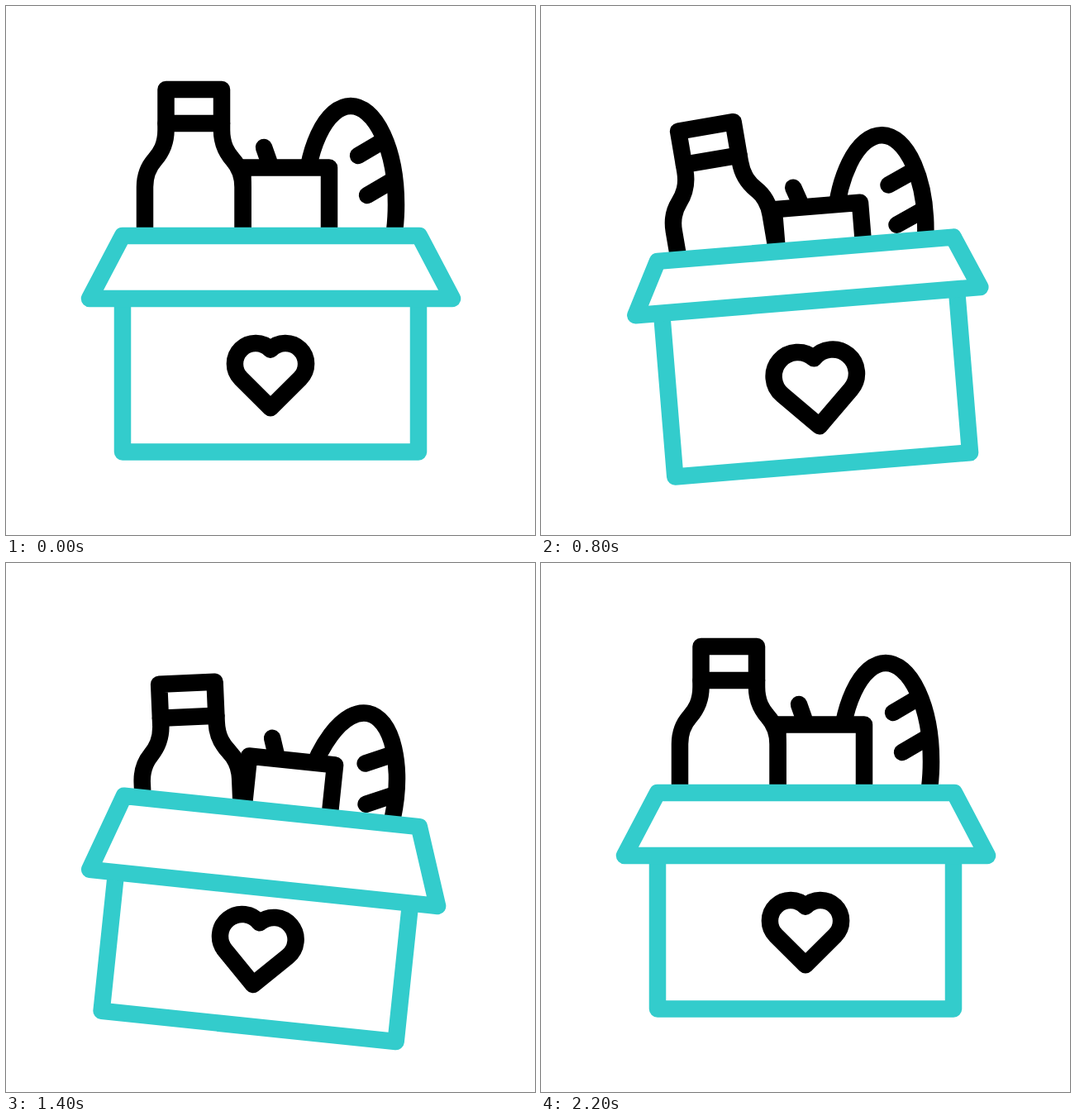
Recreate the animation shown at these times as an HTML page. Size 640 by 640 pixels, loop 2.4 s.

```html
<!DOCTYPE html>
<html lang="en">
<head>
<meta charset="utf-8">
<title>Food donation box</title>
<style>
  html, body { margin: 0; width: 100%; height: 100%; overflow: hidden; background: #fff; }
  svg { display: block; width: 100%; height: 100%; }
  .ink { fill: #fff; stroke: #000; stroke-width: 20.5; stroke-linecap: round; stroke-linejoin: round; }
  .teal { stroke: #3cc; }
</style>
</head>
<body>
<svg viewBox="0 0 640 640" class="ink">
  <!-- the scene turns around a point just below the box's top edge -->
  <g id="scene">
    <g class="teal">
      <path class="ray"/><path class="ray"/><path class="ray"/><path class="ray"/>
    </g>
    <g id="bread">
      <ellipse cx="417" cy="240" rx="55" ry="119"/>
      <path d="M426 181L454 164.500M437 229L466 212"/>
    </g>
    <g id="can">
      <path d="M312 171L318 188"/>
      <path d="M286.500 320V195.500H391V320"/>
    </g>
    <g id="bottle">
      <path d="M168 320V219C168 205 172 195 180 186C187 178 193.500 168 193.500 150V101H261V150C261 168 267.500 178 274.500 186C282.500 195 286.500 205 286.500 219V320"/>
      <path d="M193.500 142H261"/>
    </g>
    <path class="teal" d="M141 300V539.500H499V300Z"/>
    <path class="teal" id="flap"/>
    <path id="heart"/>
  </g>
</svg>
<script>
const LOOP = 2400, STEP = 20, CX = 320.5, CY = 278;
const el = id => document.getElementById(id);
const scene = el('scene'), bread = el('bread'), can = el('can');
const bottle = el('bottle'), flap = el('flap'), heart = el('heart');
const rays = document.querySelectorAll('.ray');

const smooth = p => p * p * (3 - 2 * p);

// eased value at time t from alternating times and values
function track(t, ...k) {
  if (t <= k[0]) return k[1];
  for (let i = 2; i < k.length; i += 2) {
    if (t < k[i]) {
      const p = (t - k[i - 2]) / (k[i] - k[i - 2]);
      return k[i - 1] + (k[i + 1] - k[i - 1]) * smooth(p);
    }
  }
  return k[k.length - 1];
}

// out and back, each way lasting d
const swing = (t, start, d) => track(t, start, 0, start + d, 1, start + 2 * d, 0);

function move(node, dy, angle, x, y) {
  node.setAttribute('transform', `translate(0 ${dy}) rotate(${angle} ${x} ${y})`);
}

function heartPath(k) {
  const x = v => 320 + v * k, y = v => 447 + v * k, r = 25 * k;
  return `M${x(0)} ${y(39.2)}L${x(-35.7)} ${y(3.7)}` +
    `A${r} ${r} 0 1 1 ${x(0)} ${y(-31.3)}` +
    `A${r} ${r} 0 1 1 ${x(35.7)} ${y(3.7)}Z`;
}

function flapPath(t) {
  const keys = (a, b) => track(t, 200, 0, 800, a, 1400, b, 2200, 0);
  const y = 354 + keys(-13, 17);
  const left = 101 + keys(8.1, 7.9), right = 540 - keys(12.5, 7.9);
  return `M141 278H500L${right} ${y}H${left}Z`;
}

function drawRays(t) {
  const tip = track(t, 1420, 0, 1700, 1), tail = track(t, 1700, 0, 2100, 1);
  rays.forEach((ray, i) => {
    const side = i % 2 ? 1 : -1, steep = i < 2;
    const [x0, y0, x1, y1] = steep ? [157.7, 187.5, 197.2, 235] : [224.5, 91.4, 275.8, 112.5];
    const at = p => `${CX + side * (x0 + (x1 - x0) * p)} ${CY - y0 - (y1 - y0) * p}`;
    ray.setAttribute('d', tip > tail ? `M${at(tail)}L${at(tip)}` : '');
  });
}

function draw(t) {
  const turn = track(t, 200, 0, 900, -4.95, 1500, 6.85, 2200, 0);
  move(scene, 25 * swing(t, 200, 1000), turn, CX, CY + 8);
  move(can, 37.4 * swing(t, 200, 800), 0, 0, 0);
  const b = swing(t, 300, 800), m = swing(t, 400, 800);
  move(bread, 39 * b, 8.6 * b, 417, 193);
  move(bottle, 37.4 * m, -10 * m, 227, 270);
  flap.setAttribute('d', flapPath(t));
  heart.setAttribute('d', heartPath(1 + 0.185 * (swing(t, 200, 500) + swing(t, 1200, 500))));
  drawRays(t);
}

const begin = performance.now();
function tick() {
  const t = (performance.now() - begin) % LOOP;
  draw(Math.floor(t / STEP) * STEP);
  requestAnimationFrame(tick);
}
tick();
</script>
</body>
</html>
```
